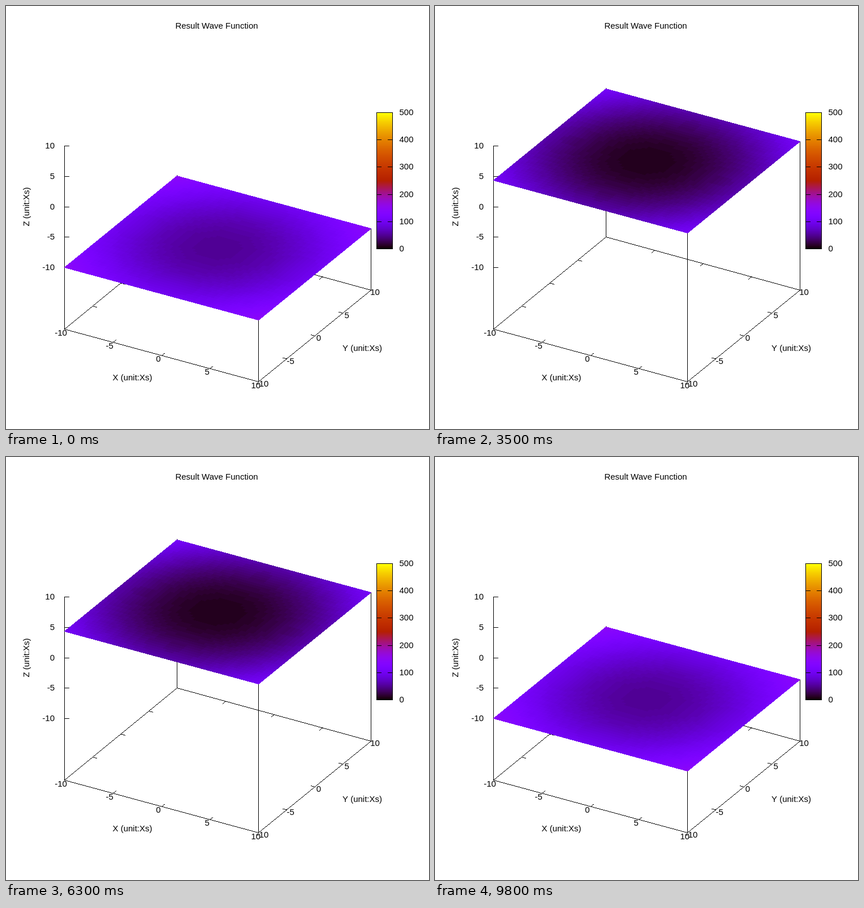
These frames come from a looping animation (748 by 748 pixels, 9900 ms). An HTML page with a canvas:

```html
<!DOCTYPE html>
<html lang="en">
<head>
<meta charset="utf-8">
<title>Wave function</title>
<style>
  html, body { margin: 0; width: 100%; height: 100%; overflow: hidden; background: #fff; }
  canvas { display: block; width: 748px; height: 748px; }
</style>
</head>
<body>
<canvas id="stage" width="748" height="748"></canvas>
<script>
const SIZE = 748, STEP_MS = 100, STEPS = 99, PEAK = 49;
const CELLS = 50, COLORS = 162, MAX_VALUE = 500;
const LEFT = { x: 103, y: 571 }, FRONT = { x: 446, y: 664 };
const RIGHT = { x: 645, y: 502 }, BACK = { x: 302, y: 408 };
const FONT = '15px "Liberation Sans", Arial, sans-serif';

function makeCanvas(width, height) {
  const canvas = document.createElement('canvas');
  canvas.width = width;
  canvas.height = height;
  return canvas;
}

const ctx = document.getElementById('stage').getContext('2d');
const backdrop = makeCanvas(SIZE, SIZE);

// Palette: red = sqrt(g), green = g^3, blue = sin(2 pi g)
const palette = Array.from({ length: COLORS }, (_, i) => {
  const g = i / (COLORS - 1);
  return [Math.sqrt(g), g ** 3, Math.max(0, Math.sin(2 * Math.PI * g))]
    .map(c => Math.round(255 * c));
});

function colorOf(value) {
  const i = Math.floor(value / MAX_VALUE * COLORS);
  return palette[Math.max(0, Math.min(COLORS - 1, i))];
}

// One-pixel line without smoothing
function line(g, x0, y0, x1, y1) {
  const n = Math.max(1, Math.round(Math.max(Math.abs(x1 - x0), Math.abs(y1 - y0))));
  g.fillStyle = '#000';
  for (let i = 0; i <= n; i++) {
    g.fillRect(Math.round(x0 + (x1 - x0) * i / n), Math.round(y0 + (y1 - y0) * i / n), 1, 1);
  }
}

// Text placed by the middle of its digits
function label(g, text, x, y, align) {
  g.font = FONT;
  g.fillStyle = '#000';
  g.textAlign = align;
  g.fillText(text, x, y + 5);
}

function drawEdge(g, a, b, tickX, tickY) {
  line(g, a.x, a.y, b.x, b.y);
  for (let i = 1; i < 4; i++) {
    const x = a.x + (b.x - a.x) * i / 4, y = a.y + (b.y - a.y) * i / 4;
    line(g, x, y, x + tickX, y + tickY);
  }
}

function drawColorBar(g) {
  const x = 655, top = 188, width = 28, height = 241;
  for (let i = 0; i < height; i++) {
    g.fillStyle = `rgb(${colorOf(MAX_VALUE * (1 - i / height))})`;
    g.fillRect(x, top + i, width, 1);
  }
  line(g, x, top, x + width, top);
  line(g, x, top + height, x + width, top + height);
  line(g, x, top, x, top + height);
  line(g, x + width, top, x + width, top + height);
  for (let i = 0; i <= 5; i++) {
    const y = Math.round(top + height * (1 - i / 5));
    line(g, x, y, x + 8, y);
    line(g, x + width - 8, y, x + width, y);
    label(g, String(i * 100), 695.5, y, 'left');
  }
}

function drawBackdrop(g) {
  g.fillStyle = '#fff';
  g.fillRect(0, 0, SIZE, SIZE);
  drawEdge(g, LEFT, FRONT, 5, -4);
  drawEdge(g, BACK, RIGHT, -5, 4);
  drawEdge(g, FRONT, RIGHT, -7, -2);
  drawEdge(g, LEFT, BACK, 7, 2);
  line(g, LEFT.x, 247, LEFT.x, LEFT.y);

  for (let i = 0; i < 5; i++) {
    const text = String(i * 5 - 10);
    const y = Math.round(462 - 53.75 * i);
    line(g, LEFT.x, y, LEFT.x + 8, y);
    label(g, text, 86, y, 'right');
    label(g, text, 97 + 86.2 * i, 577.5 + 23.25 * i, 'center');
    label(g, text, 453.5 + 49.75 * i, 668 - 40.5 * i, 'center');
  }

  label(g, 'Result Wave Function', 372.5, 35, 'center');
  label(g, 'X (unit:Xs)', 223.5, 657, 'center');
  label(g, 'Y (unit:Xs)', 630, 605, 'center');
  g.save();
  g.translate(36, 355);
  g.rotate(-Math.PI / 2);
  label(g, 'Z (unit:Xs)', 0, 0, 'center');
  g.restore();
  drawColorBar(g);
}

// Surface pixels paired with the x-y part of their cell's energy
const sheet = makeCanvas(RIGHT.x - LEFT.x + 1, FRONT.y - BACK.y + 1);
const sheetCtx = sheet.getContext('2d');
const sheetData = sheetCtx.createImageData(sheet.width, sheet.height);
const samples = [];

function buildSurface() {
  const ax = FRONT.x - LEFT.x, ay = FRONT.y - LEFT.y;
  const bx = RIGHT.x - FRONT.x, by = RIGHT.y - FRONT.y;
  const det = ax * by - ay * bx;
  const cell = 20 / CELLS, slack = 0.002;
  const outside = t => t < -slack || t > 1 + slack;
  const middle = t => {
    const i = Math.max(0, Math.min(CELLS - 1, Math.floor(t * CELLS)));
    return (i + 0.5) * cell - 10;
  };
  for (let py = 0; py < sheet.height; py++) {
    for (let px = 0; px < sheet.width; px++) {
      const dy = py + BACK.y - LEFT.y;
      const u = (px * by - dy * bx) / det;
      const v = (ax * dy - ay * px) / det;
      if (outside(u) || outside(v)) continue;
      const energy = (middle(u) ** 2 + middle(v) ** 2 + cell ** 2 / 2) / 2;
      samples.push({ at: 4 * (py * sheet.width + px), energy });
    }
  }
}

function drawStep(step) {
  const z = 10 - 20 * Math.abs(step - PEAK) / PEAK;
  const lift = Math.round(108.5 + 10.78 * (z + 10));
  const pixels = sheetData.data;
  for (const { at, energy } of samples) {
    const [r, g, b] = colorOf(energy + z * z / 2);
    pixels[at] = r;
    pixels[at + 1] = g;
    pixels[at + 2] = b;
    pixels[at + 3] = 255;
  }
  sheetCtx.putImageData(sheetData, 0, 0);

  ctx.drawImage(backdrop, 0, 0);
  for (const p of [BACK, RIGHT, FRONT]) line(ctx, p.x, p.y, p.x, p.y - lift);
  ctx.drawImage(sheet, LEFT.x, BACK.y - lift);
}

let shown = -1;
const start = performance.now();

function tick() {
  const elapsed = Math.max(0, performance.now() - start);
  const step = Math.floor(elapsed / STEP_MS) % STEPS;
  if (step !== shown) drawStep(shown = step);
  requestAnimationFrame(tick);
}

drawBackdrop(backdrop.getContext('2d'));
buildSurface();
tick();
</script>
</body>
</html>
```
